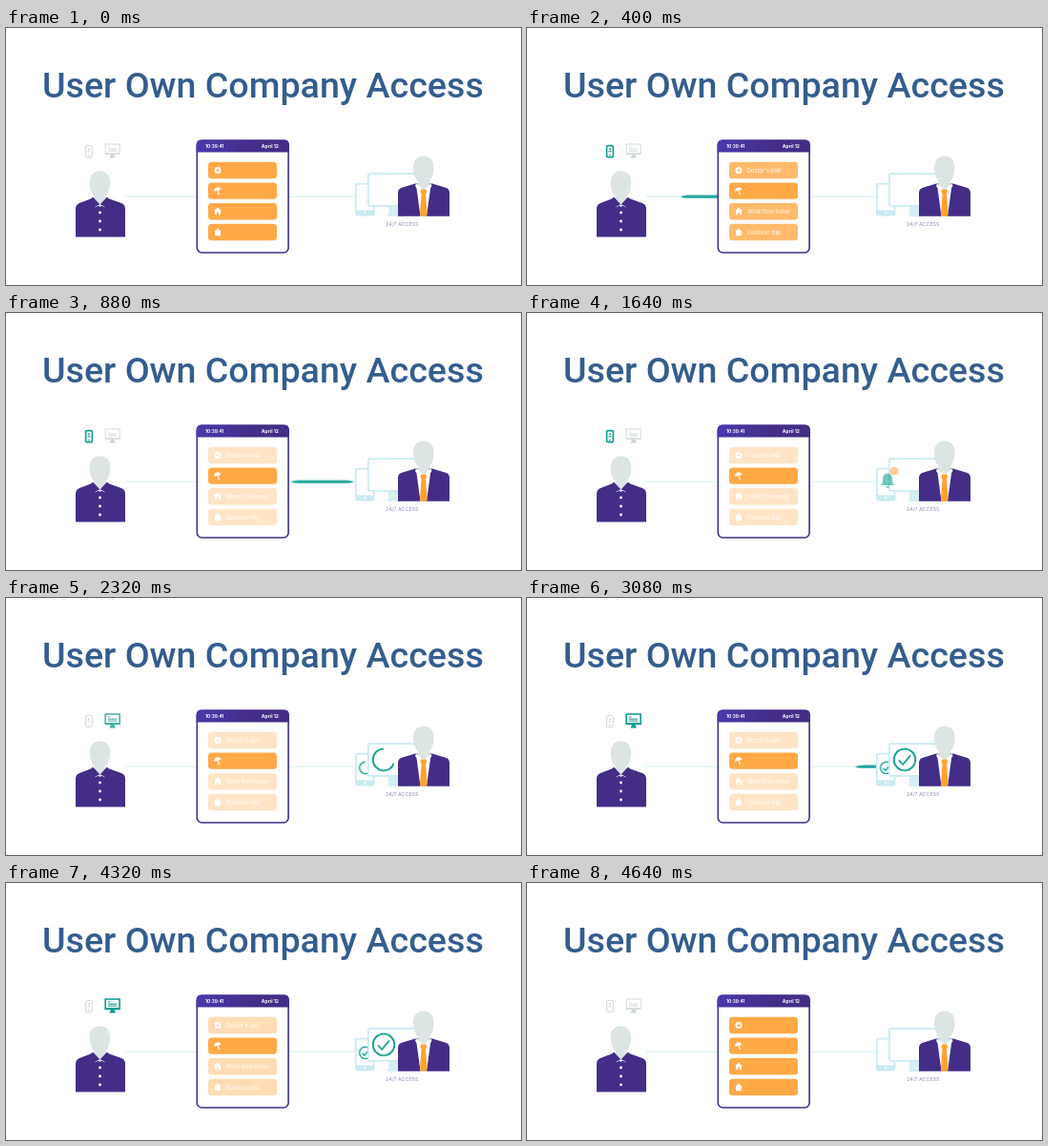
An HTML page that plays this animation: 540x270 px, repeating every 4680 ms.

```html
<!DOCTYPE html>
<html lang="en">
<head>
<meta charset="utf-8">
<title>User Own Company Access</title>
<style>
  html, body { margin: 0; width: 100%; height: 100%; overflow: hidden; background: #fff; }
  svg { display: block; }
  .stage { width: 540px; height: 270px; }
  .title { font: 500 37.6px Roboto, sans-serif; fill: #345d8f; }
  .small { font-family: Inter, sans-serif; }

  .comet, .pale, .label, .phone-on, .screen-on, .bell, .done, .ring, .tick {
    animation: 4680ms linear infinite;
  }
  .comet { fill: #129f9a; }
  .near { animation-name: near; }
  .far { animation-name: far; }
  .pale { animation-name: pale; }
  .label { animation-name: label; }
  .phone-on { animation-name: phone-on; }
  .screen-on { animation-name: screen-on; }
  .bell { animation-name: bell; transform-box: fill-box; transform-origin: center; }
  .done { animation-name: done; fill: none; stroke: #0e9f91; }
  .ring { animation-name: ring; }
  .tick { animation-name: tick; }
  .ring, .tick { stroke-dasharray: 1 2; }

  /* requests travel right, replies travel left */
  @keyframes near {
    0%, 1.41% { transform: translateX(-67px); }
    11.67%, 76.07% { transform: translateX(80px); }
    86.32%, 100% { transform: translateX(-67px); }
  }
  @keyframes far {
    0%, 13.68% { transform: translateX(-67px); }
    23.93%, 64.1% { transform: translateX(70px); }
    74.36%, 100% { transform: translateX(-67px); }
  }
  @keyframes pale {
    0%, 6.84% { opacity: 1; }
    12.82%, 91.45% { opacity: .31; }
    97.44%, 100% { opacity: 1; }
  }
  @keyframes label {
    0%, 3.4% { opacity: 0; }
    7.69%, 94.9% { opacity: .85; }
    98.7%, 100% { opacity: 0; }
  }
  @keyframes phone-on {
    0%, 1.2% { opacity: 0; }
    5.1%, 41.88% { opacity: 1; }
    46.15%, 100% { opacity: 0; }
  }
  @keyframes screen-on {
    0%, 41.88% { opacity: 0; }
    52.99%, 93.16% { opacity: 1; }
    98.29%, 100% { opacity: 0; }
  }
  @keyframes bell {
    0%, 19.66% { opacity: 0; transform: scale(.3); }
    22.22% { opacity: 1; transform: scale(1.1); }
    23.93%, 33.33% { opacity: 1; transform: none; }
    37.61%, 100% { opacity: 0; transform: none; }
  }
  @keyframes done {
    0%, 41.87% { opacity: 0; }
    41.88%, 93.16% { opacity: 1; }
    98.29%, 100% { opacity: 0; }
  }
  @keyframes ring {
    0%, 41.88% { stroke-dashoffset: 1; }
    52.99%, 100% { stroke-dashoffset: 0; }
  }
  @keyframes tick {
    0%, 54.7% { stroke-dashoffset: 1; }
    60.68%, 100% { stroke-dashoffset: 0; }
  }
</style>
</head>
<body>
<svg class="stage" viewBox="0 0 540 270">
  <defs>
    <linearGradient id="header">
      <stop stop-color="#4b38ad"/>
      <stop offset=".6" stop-color="#432d87"/>
    </linearGradient>
    <path id="comet" d="M0 0Q3-1.6 8-1.6H58Q63-1.6 66 0Q63 1.6 58 1.6H8Q3 1.6 0 0Z"/>
    <rect id="button" x="212" width="72" height="17.4" rx="3.5" fill="#ffa947"/>
    <g id="phone" fill="none" stroke="currentColor">
      <rect x="83.6" y="123.6" width="6.8" height="12" rx="1.2"/>
      <path d="M85.4 129.8h3.2M86.2 133.6h1.6" stroke-width="1"/>
      <circle cx="87" cy="127.2" r="1" fill="currentColor" stroke="none"/>
    </g>
    <g id="screen" fill="none" stroke="currentColor">
      <path d="M104.2 132.4V122H119.2V132.4ZM104.2 131.8H119.2"/>
      <path d="M110 133h3.4l1.4 3.6h-6.2Z" fill="currentColor" stroke="none"/>
      <path d="M107 125h2.4M107 127.2h9M107 129.2h9" stroke-width=".9"/>
    </g>
    <path id="head" d="M-10.8-3C-10.8-10.5-6-14.8 0-14.8S10.8-10.5 10.8-3C10.8 4.5 8.6 9.4 6 11.6V19L0 23L-6 19V11.6C-8.6 9.4-10.8 4.5-10.8-3Z" fill="#dce4e4"/>
  </defs>

  <text class="title" x="38" y="73">User Own Company Access</text>

  <path d="M125 177.3H200M296 177.3H366" stroke="#e2f4f4" stroke-width="1.6"/>
  <svg x="125" y="170" width="75" height="14"><g transform="translate(0 7.3)"><use href="#comet" class="comet near"/></g></svg>
  <svg x="297" y="170" width="69" height="14"><g transform="translate(0 7.3)"><use href="#comet" class="comet far"/></g></svg>

  <!-- employee -->
  <g color="#cdd5d5" stroke-width=".9"><use href="#phone"/><use href="#screen"/></g>
  <g color="#0e9f91" stroke-width="1.6">
    <use href="#phone" class="phone-on"/>
    <use href="#screen" class="screen-on"/>
  </g>
  <path d="M73 219.6V190Q73 185.5 77 184L90 179H107L121 184Q125 185.5 125 190V219.6Z" fill="#432d87"/>
  <use href="#head" x="98.5" y="165"/>
  <path d="M91 177.6L98.5 185.5L106 177.6L109 181L103.5 188L98.5 185.5L93.5 188L88 181Z" fill="#432d87"/>
  <path d="M93.5 188L98.5 185.5L103.5 188" fill="none" stroke="#e9e8f3" stroke-width=".7"/>
  <g fill="#fff">
    <circle cx="98.5" cy="194" r="1.4"/>
    <circle cx="98.5" cy="203" r="1.4"/>
    <circle cx="98.5" cy="212" r="1.4"/>
  </g>

  <!-- request card -->
  <rect x="200.3" y="118.3" width="95.8" height="117.7" rx="5" fill="#fff" stroke="#432d87" stroke-width="1.6"/>
  <path d="M199.6 130.4V123Q199.6 117.6 205 117.6H291.5Q296.9 117.6 296.9 123V130.4Z" fill="url(#header)"/>
  <g class="small" fill="#fff" font-size="5" font-weight="700">
    <text x="209" y="126.3" font-size="4.7">10:39:41</text>
    <text x="286" y="126.3" text-anchor="end">April 12</text>
  </g>
  <g class="small" fill="#fff" font-size="5.6" font-weight="500">
    <g class="pale">
      <use href="#button" y="140.8"/>
      <use href="#button" y="184"/>
      <use href="#button" y="205.8"/>
      <circle cx="222" cy="149.5" r="3.5"/>
      <path d="M222 147.7v3.6M220.2 149.5h3.6" stroke="#ffa947" stroke-width="1"/>
      <path d="M222 188.6L226 192.3H225V196.3H223V193.8H221V196.3H219V192.3H218Z"/>
      <path d="M220.8 212.6V210.7H223.2V212.6H225V218.2H219V212.6Z"/>
      <g class="label">
        <text x="231" y="151.5">Doctor's visit</text>
        <text x="231" y="194.7">Work from home</text>
        <text x="231" y="216.5">Business trip</text>
      </g>
    </g>
    <use href="#button" y="162.4"/>
    <g transform="rotate(-15 222 171)">
      <path d="M218.2 171Q218.6 167.3 222 167.3T225.8 171Q224.8 170 223.6 171Q222 170 220.6 171Q219.4 170 218.2 171Z"/>
      <path d="M222.2 170V174.2Q222.2 175 223.2 175" fill="none" stroke="#fff" stroke-width="1.1"/>
    </g>
  </g>

  <!-- company devices -->
  <rect x="366.8" y="163.7" width="18.8" height="32.8" rx="2" fill="#fff" stroke="#c9eaf1" stroke-width="1.8"/>
  <path d="M367 191.4H385.5V196.5H367Z" fill="#c9eaf1"/>
  <circle cx="376.3" cy="194" r="1.1" fill="#fff"/>
  <g class="done" transform="translate(376.8 178.3) scale(.55)" stroke-width="2.5">
    <path class="ring" pathLength="1" d="M0-11.3a11.3 11.3 0 0 0 0 22.6a11.3 11.3 0 0 0 0-22.6"/>
    <path class="tick" pathLength="1" d="M-6 .6L-1.8 5L6-4.4"/>
  </g>
  <path d="M401 187H412V196H401Z" fill="#d5eff4"/>
  <path d="M400 197H416" stroke="#c9eaf1" stroke-width="1.6"/>
  <rect x="379.8" y="153.2" width="55" height="33.6" rx="1.5" fill="#fff" stroke="#c9eaf1" stroke-width="1.8"/>
  <g class="done" transform="translate(396 169.8)" stroke-width="1.8">
    <path class="ring" pathLength="1" d="M0-11.3a11.3 11.3 0 0 0 0 22.6a11.3 11.3 0 0 0 0-22.6"/>
    <path class="tick" pathLength="1" d="M-6 .6L-1.8 5L6-4.4"/>
  </g>
  <g class="bell">
    <path d="M371 181Q373 179 373 174.5Q373 169 378 168.5Q383 169 383 174.5Q383 179 385 181ZM376 182H380Q379.5 184 378 184T376 182Z" fill="#0e9f91"/>
    <circle cx="385" cy="166" r="4.5" fill="#ffa947"/>
  </g>

  <!-- manager -->
  <path d="M411 197.7V173Q411 169 415 167.7L429 163.5H447L461 167.7Q465 169 465 173V197.7Z" fill="#432d87"/>
  <path d="M430 164.500L434.500 197.700H441L445.600 164.500Z" fill="#fff"/>
  <use href="#head" x="437.8" y="149.3"/>
  <path d="M430 163.600L437.800 170L445.600 163.600L446.500 166L441.500 172.500L437.800 170L434 172.500L429 166Z" fill="#fff"/>
  <path d="M435.3 169.5H440.3L441.2 172L440 174.5L441.6 195L440.6 197.7H435L434 195L435.6 174.5L434.4 172Z" fill="#ffa22e"/>
  <text class="small" x="398" y="208.2" font-size="5.3" fill="#a199c4" font-weight="500">24/7 ACCESS</text>
</svg>
</body>
</html>
```
